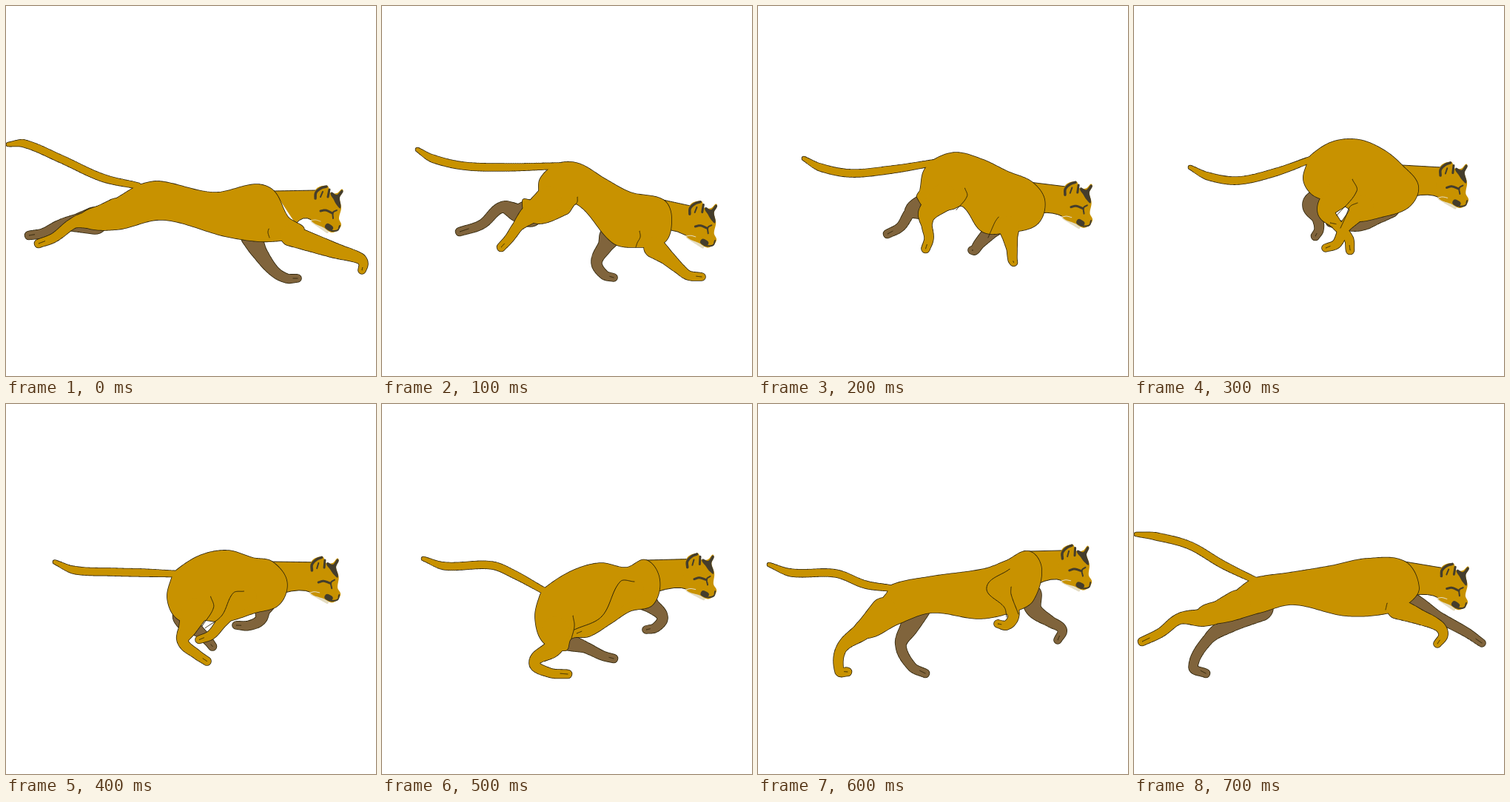
An HTML page with a canvas that plays this animation: 500x500 px, repeating every 0.8 s.

```html
<!DOCTYPE html>
<html lang="en">
<head>
<meta charset="utf-8">
<title>Running cat</title>
<style>
html, body { margin: 0; width: 100%; height: 100%; overflow: hidden; background: #fff; }
canvas { display: block; width: 100vw; height: 100vh; }
</style>
</head>
<body>
<canvas id="stage" width="500" height="500"></canvas>
<script>
const GOLD = '#c89200', BROWN = '#80643c', INK = '#2a2108';
const DARK = '#443d2c', PALE = '#e4dcc2';
const STEP = 100, SPAN = 24;

// Half-widths at the joints, from the body outwards.
const FORE = [14, 10, 7, 6, 5], HIND = [18, 12, 7, 6, 5.5], TAIL = [4, 5, 5, 5, 2.5];

const points = s => s.split(' ').map(p => p.split(',').map(Number));
const mix = (a, b, t) => Array.isArray(a) ? a.map((v, i) => mix(v, b[i], t)) : a + (b - a) * t;

// head: nose and angle; trunk: clockwise from the tail; limbs: five joints each.
const pose = (head, trunk, tail, fore, hind, farFore, farHind, ...creases) =>
  [head, ...[trunk, tail, fore, hind, farFore, farHind].map(points), creases.map(points)];

const stretch = pose([452, 295, 0],
  '182,241 208,237 281,252 338,241 362,250 381,285 402,304 360,318 300,312 212,289 150,302 104,298 102,281 140,265 172,246',
  '178,243 130,232 75,207 25,186 3,187',
  '385,310 443,330 478,341 483,348 481,357', '150,278 115,288 92,293 65,313 44,321',
  '332,312 342,332 362,358 379,368 394,368', '120,290 98,293 74,296 50,307 31,310',
  '355,301 354,306 356,313');
const land = pose([451, 315, -2],
  '238,213 266,213 302,234 336,252 380,262 391,285 382,319 344,326 312,320 264,268 250,281 205,293 190,263 209,262 214,233',
  '240,216 165,218 110,216 68,206 48,194',
  '368,326 383,338 402,355 414,364 432,366', '225,262 198,283 184,297 172,314 161,326',
  '308,312 303,322 290,346 300,363 313,367', '200,280 185,280 162,272 135,295 105,305',
  '264,258 264,264 262,268', '348,304 349,312 345,320 343,326');
const gather = pose([451, 261, -5],
  '240,201 270,183 305,181 338,195 362,215 384,243 372,271 335,285 295,290 290,274 275,268 262,264 240,254 229,235 234,213',
  '240,207 190,225 140,236 100,230 76,218',
  '310,270 298,284 284,300 274,321 259,327', '276,255 260,276 272,293 290,314 292,330',
  '345,272 330,283 308,296 285,297 265,293', '255,262 240,269 248,287 250,302 245,311',
  '295,234 301,250 274,283', '302,266 292,271 286,285 279,300');
const push = pose([451, 251, -7.5],
  '221,248 258,225 295,215 330,221 357,211 375,237 366,271 335,280 310,296 280,314 256,317 248,333 218,322 207,290 213,260',
  '218,252 180,231 148,218 85,219 56,209',
  '340,250 316,268 297,292 280,303 263,310', '234,305 232,328 206,349 226,363 251,365',
  '355,264 364,272 379,288 370,302 357,305', '232,310 248,320 275,329 298,340 313,344',
  '258,286 260,300 256,317', '341,240 322,240 297,287 260,305');
const leap = pose([450, 239, -8],
  '182,244 235,233 305,223 335,212 366,199 383,222 372,265 350,279 300,290 235,282 190,297 150,316 130,305 150,283 173,257',
  '180,249 145,244 105,229 45,228 15,217',
  '340,255 342,272 345,288 336,299 324,297', '170,280 142,306 113,330 110,361 121,362',
  '369,258 373,278 395,294 411,305 405,319', '215,275 205,300 193,326 208,355 226,364',
  '340,223 309,248 333,275 336,288', '342,247 342,257 352,284');
const reach = pose([450, 267, -1],
  '168,234 210,228 265,219 315,209 366,213 385,248 371,269 341,283 285,286 215,271 170,282 110,296 85,281 125,262 154,240',
  '163,238 120,217 75,191 30,179 3,176',
  '356,276 384,287 412,300 418,312 410,324', '140,270 95,288 62,290 36,309 11,321',
  '360,262 380,268 410,287 450,309 470,323', '170,275 132,295 101,317 80,355 97,364',
  '342,269 340,278');

const poses = [stretch, land, mix(land, gather, 0.5), gather, mix(gather, push, 0.5), push, leap, reach];

const ctx = document.getElementById('stage').getContext('2d');
ctx.lineJoin = ctx.lineCap = 'round';

// Samples a smooth curve through the points; each tangent follows the neighbours.
function curve(pts, closed) {
  const n = pts.length;
  const at = i => closed ? pts[(i + n) % n] : pts[Math.max(0, Math.min(n - 1, i))];
  const dir = i => {
    const [ax, ay] = at(i - 1), [bx, by] = at(i + 1), len = Math.hypot(bx - ax, by - ay) || 1;
    return [(bx - ax) / len, (by - ay) / len];
  };
  const out = [];
  for (let i = 0; i < (closed ? n : n - 1); i++) {
    const a = at(i), b = at(i + 1), da = dir(i), db = dir(i + 1);
    const len = Math.hypot(b[0] - a[0], b[1] - a[1]);
    for (let s = 0; s < SPAN; s++) {
      const t = s / SPAN, u = 1 - t, ease = t * t * (3 - 2 * t);
      out.push([0, 1].map(k =>
        mix(a[k], b[k], ease) + len * t * u * (u * da[k] - t * db[k])));
    }
  }
  return closed ? out : [...out, pts[n - 1]];
}

function trace(pts, closed) {
  const path = new Path2D();
  curve(pts, closed).forEach(p => path.lineTo(...p));
  if (closed) path.closePath();
  return path;
}

// A limb is a row of discs whose radius follows the profile.
function limb(joints, profile) {
  const path = new Path2D();
  curve(joints).forEach(([x, y], i) => {
    const k = Math.floor(i / SPAN), next = profile[k + 1] ?? profile[k];
    const r = mix(profile[k], next, i % SPAN / SPAN);
    path.moveTo(x + r, y);
    path.arc(x, y, r, 0, 2 * Math.PI);
  });
  return path;
}

function stroke(path, width = 1, color = INK) {
  ctx.lineWidth = width;
  ctx.strokeStyle = color;
  ctx.stroke(path);
}

function fill(path, color) {
  ctx.fillStyle = color;
  ctx.fill(path);
}

// Joins several shapes under one common outline.
function join(paths, color) {
  paths.forEach(p => stroke(p, 1.6));
  paths.forEach(p => fill(p, color));
}

const toe = joints => stroke(trace([joints[4], mix(joints[4], joints[3], 0.4)]));

function drawNeck([x, y, angle], trunk) {
  const a = angle * Math.PI / 180, c = Math.cos(a), s = Math.sin(a);
  const turn = (px, py) => [x + px * c - py * s, y + px * s + py * c];
  const ear = turn(-32, -46), jaw = turn(-39, -6), bend = turn(-51, -13);
  const chest = mix(trunk[5], trunk[6], 0.5);
  const top = trace([trunk[4], ear]), low = new Path2D();
  low.moveTo(...chest);
  low.quadraticCurveTo(...bend, ...jaw);
  const neck = new Path2D(low);
  [turn(-15, -10), ear, trunk[4]].forEach(p => neck.lineTo(...p));
  fill(neck, GOLD);
  stroke(top);
  stroke(low);
}

const patch = (s, color) => fill(trace(points(s), true), color);
const mark = (s, width, color = DARK) => stroke(trace(points(s)), width, color);

function drawHead([x, y, angle]) {
  ctx.save();
  ctx.translate(x, y);
  ctx.rotate(angle * Math.PI / 180);
  mark('-38,-4 -28,3 -18,10', 4, PALE);
  patch('-40,-7 -34,-46 -18,-52 -14,-43 -5,-42 3,-47 -1,-36 1,-22 -2,-8 1,1 -4,8 -12,11 -22,5', GOLD);
  patch('-13,-43 -5,-40 3,-46 -1,-36 0,-22 -5,-26 -9,-33', DARK);
  mark('-34,-35 -33,-43 -26,-49 -19,-51', 3.5);
  mark('-15,-47 -17,-37', 3);
  mark('-24,-44 -27,-37', 2);
  mark('-27,-18 -20,-19 -11,-15', 3);
  mark('-5,-19 -10,-16 -10,-8', 2);
  mark('-17,3 -14,5', 8);
  mark('-12,9 -4,8 -1,2', 2);
  mark('-41,-5 -34,-6 -27,-4', 1, PALE);
  ctx.restore();
}

function drawPose([head, trunk, tail, fore, hind, farFore, farHind, creases]) {
  ctx.clearRect(0, 0, 500, 500);
  join([limb(farFore, FORE), limb(farHind, HIND)], BROWN);
  drawNeck(head, trunk);
  drawHead(head);
  join([limb(tail, TAIL), trace(trunk, true), limb(fore, FORE), limb(hind, HIND)], GOLD);
  creases.forEach(c => stroke(trace(c)));
  [fore, hind, farFore, farHind].forEach(toe);
}

function tick() {
  drawPose(poses[Math.floor(performance.now() / STEP) % poses.length]);
  requestAnimationFrame(tick);
}
tick();
</script>
</body>
</html>
```
